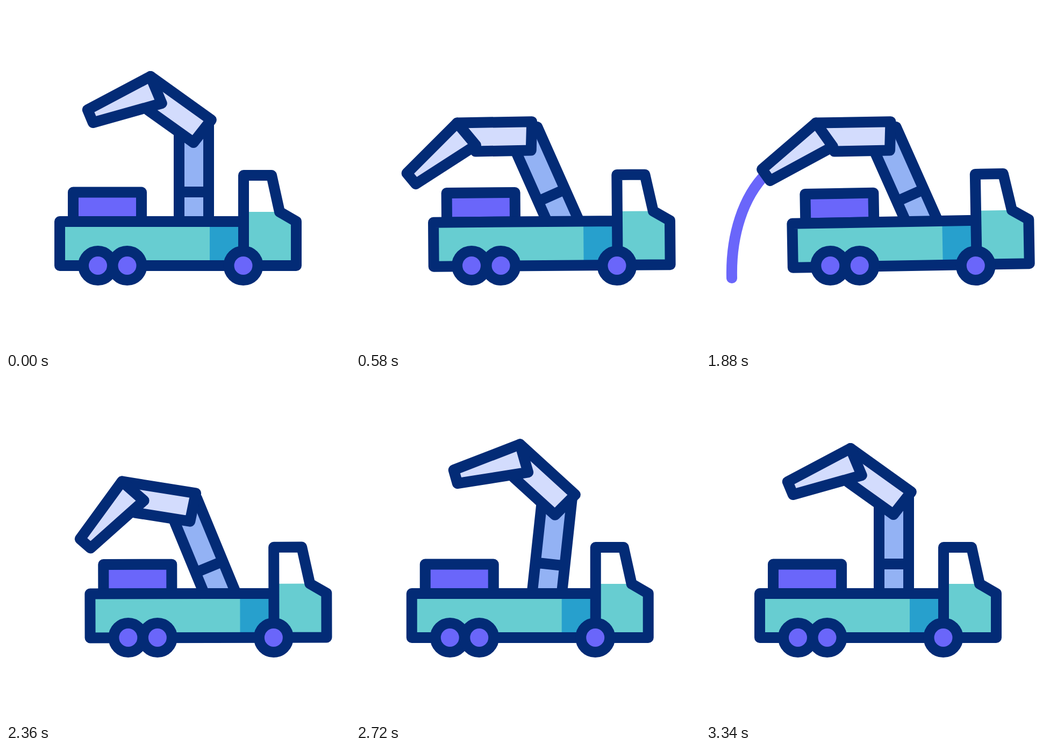
Write an HTML page that moves like this. It is 640x640 px and loops after 3.6 s.

```html
<!DOCTYPE html>
<html lang="en">
<head>
<meta charset="utf-8">
<title>Crane truck</title>
<style>
  html, body { margin: 0; width: 100%; height: 100%; overflow: hidden; background: #fff; }
  svg { display: block; width: 100%; height: 100%; }
  .line { stroke: #032b76; stroke-width: 20; stroke-linecap: round; stroke-linejoin: round; }
  .none { fill: none; }
  .purple { fill: #6a66fa; }
  .teal { fill: #67cdd1; }
  .blue { fill: #27a0cd; }
  .mid { fill: #93b2f4; }
  .pale { fill: #d3dcfd; }
  #water { fill: none; stroke: #6a66fa; stroke-width: 20; stroke-linecap: round; }
</style>
</head>
<body>
<svg viewBox="0 0 640 640">
  <g id="truck">
    <path id="water" pathLength="1" d="M51.7 312C9.7 354-14.3 425-12.3 506"/>
    <g id="post">
      <path class="line mid" d="M-27.5-200H27.5V0H-27.5ZM-27.5-73H27.5"/>
      <g id="boom">
        <path class="line pale" d="M-80-123L33-42 0 0-84-60Z"/>
        <g id="tip">
          <path class="line pale" d="M0 0L21 50-107 86-117 62Z"/>
        </g>
      </g>
    </g>
    <g id="body">
      <path class="line purple" d="M125 401V346.500H252V401Z"/>
      <path class="teal" d="M100 401H442V383H509L540 401V483H100Z"/>
      <path class="blue" d="M379 401H442V483H379Z"/>
      <path class="line none" d="M442 401H100V483H540V401L509 383 494 315H442V483"/>
    </g>
    <g class="line purple">
      <circle cx="171" cy="483" r="27"/>
      <circle cx="225.500" cy="483" r="27"/>
      <circle cx="441.500" cy="483" r="27"/>
    </g>
  </g>
</svg>
<script>
const LOOP = 3600;
const DRIVE = 60.3;

// Each track lists [ms, value]; values ease between neighbouring keys.
const tracks = {
  drive: [[120, 0], [820, DRIVE], [2280, DRIVE], [2800, 0]],
  tilt: [[320, 0], [880, -1], [1960, -1], [2480, 0]],
  post: [[0, 0], [440, -24], [2300, -24], [2740, 6.3], [3340, 0]],
  boom: [[80, 0], [520, -12.6], [2100, -12.6], [2540, 0.7], [3340, 0]],
  tip: [[260, 0], [700, 23.8], [1960, 23.8], [2400, 0]],
  head: [[1010, 0], [1560, 1]],
  tail: [[1880, 0], [2350, 1]]
};

const smooth = u => u * u * (3 - 2 * u);
const linear = u => u;

function valueAt(keys, t, ease = smooth) {
  if (t <= keys[0][0]) return keys[0][1];
  for (let i = 1; i < keys.length; i++) {
    const [t0, a] = keys[i - 1], [t1, b] = keys[i];
    if (t < t1) return a + (b - a) * ease((t - t0) / (t1 - t0));
  }
  return keys[keys.length - 1][1];
}

const el = id => document.getElementById(id);
const parts = Object.fromEntries(
  ["truck", "body", "post", "boom", "tip", "water"].map(id => [id, el(id)]));

const place = (part, x, y, angle = 0) =>
  part.setAttribute("transform", `translate(${x} ${y}) rotate(${angle})`);

function draw(t) {
  const at = name => valueAt(tracks[name], t);
  place(parts.truck, at("drive"), 0);
  place(parts.post, 349.5, 419, at("post"));
  place(parts.boom, -0.7, -165, at("boom"));
  place(parts.tip, -80, -123, at("tip"));
  parts.body.setAttribute("transform", `rotate(${at("tilt")} 320 399)`);

  const head = valueAt(tracks.head, t, linear);
  const tail = valueAt(tracks.tail, t, linear);
  const { style } = parts.water;
  style.visibility = head > tail ? "visible" : "hidden";
  style.strokeDasharray = `${head - tail} 2`;
  style.strokeDashoffset = -tail;
}

const start = performance.now();
function tick() {
  draw((performance.now() - start) % LOOP);
  requestAnimationFrame(tick);
}
tick();
</script>
</body>
</html>
```
